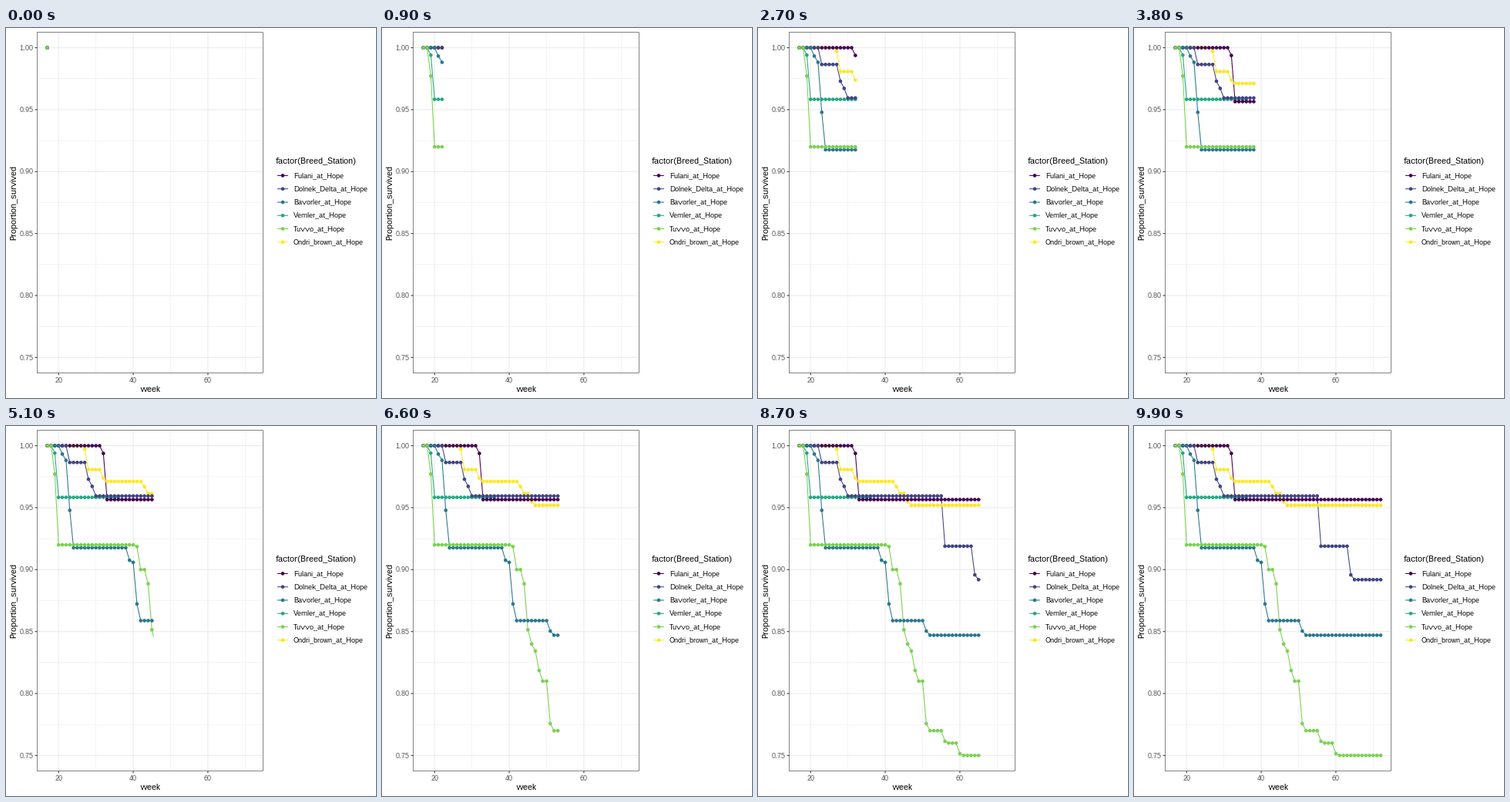
Write a matplotlib script that moves like this. It is 480 px wide and 480 px high and loops after 10000 ms.

```python
import numpy as np
import matplotlib.pyplot as plt
from matplotlib.animation import FuncAnimation
from matplotlib.patches import Rectangle

SIZE, FRAMES, INTERVAL = 480, 100, 100
PT = 0.72  # points per pixel at 100 dpi
FIRST, LAST = 17, 72
LEFT, RIGHT, TOP, BOTTOM = 40.35, 333.35, 5.5, 447.5
STROKE, DOT = 1.067, (4.62 * PT) ** 2
GRID, INK, GREY = "#EBEBEB", "#333333", "#4D4D4D"

plt.rcParams.update({
    "font.family": "Liberation Sans",
    "text.hinting": "default",
    "text.hinting_factor": 1,
    "path.snap": False,
    "lines.solid_capstyle": "butt",
})

# name, colour, flock size, last week, {day of trial: deaths}
FLOCKS = [
    ("Fulani", "#440154", 23, 72, {111: 1}),
    ("Dolnek_Delta", "#414487", 74, 72, {42: 1, 77: 1, 88: 1, 273: 3, 330: 2}),
    ("Bavorler", "#2A788E", 85, 72, {31: 1, 45: 6, 155: 1, 170: 4, 240: 1}),
    ("Vemler", "#22A884", 24, 36, {20: 1}),
    ("Tuvvo", "#7AD151", 100, 72, {19: 8, 174: 1, 175: 1, 194: 4, 197: 1, 203: 1,
                                   213: 1, 220: 2, 239: 4, 274: 1, 302: 1}),
    ("Ondri_brown", "#FDE725", 104, 72, {76: 2, 107: 1, 186: 1, 205: 1}),
]
DOT_ORDER = [3, 5, 0, 1, 2, 4]


def px(week):
    scale = (RIGHT - LEFT) / 1.1 / (LAST - FIRST)
    return LEFT + (RIGHT - LEFT) / 22 + (week - FIRST) * scale


def py(share):
    return TOP + (BOTTOM - TOP) / 22 + (1 - share) * (BOTTOM - TOP) / 1.1 / 0.25


def survival(flock, last, deaths):
    """Weekly mean of the daily share alive, with each week's reveal time."""
    weeks = np.arange(FIRST, last + 1)
    lost = sum(n * np.clip(weeks - FIRST + 1 - day / 7, 0, 1)
               for day, n in deaths.items())
    time = np.round((FRAMES - 1) * (weeks - FIRST) / (LAST - FIRST))
    return px(weeks), py(1 - lost / flock), time


fig = plt.figure(figsize=(4.8, 4.8), dpi=100, facecolor="white")
ax = fig.add_axes([0, 0, 1, 1])
ax.set(xlim=(0, SIZE), ylim=(SIZE, 0))
ax.axis("off")


def rule(x, y, color, width=STROKE):
    ax.plot(x, y, color=color, lw=width * PT, zorder=1)


def label(x, y, text, size=8.8, color="black", **kw):
    ax.text(x, y, text, fontsize=size * PT, color=color, va="baseline", **kw)


# Panel
for week in (30, 50, 70):
    rule([px(week)] * 2, [TOP, BOTTOM], GRID, STROKE / 2)
for share in np.arange(0.775, 1, 0.05):
    rule([LEFT, RIGHT], [py(share)] * 2, GRID, STROKE / 2)
for week in (20, 40, 60):
    x = px(week)
    rule([x, x], [TOP, BOTTOM], GRID)
    rule([x, x], [BOTTOM, BOTTOM + 2.75], INK)
    label(x, 460, str(week), color=GREY, ha="center")
for share in np.linspace(0.75, 1, 6):
    y = py(share)
    rule([LEFT, RIGHT], [y, y], GRID)
    rule([LEFT - 2.75, LEFT], [y, y], INK)
    label(35.4, y + 3.1, f"{share:.2f}", color=GREY, ha="right")
ax.add_patch(Rectangle((LEFT, TOP), RIGHT - LEFT, BOTTOM - TOP, fill=False,
                       ec=INK, lw=0.6 * PT, zorder=6))
label((LEFT + RIGHT) / 2, 472.3, "week", 11, ha="center")
label(13.2, (TOP + BOTTOM) / 2, "Proportion_survived", 11, ha="center",
      rotation=90, rotation_mode="anchor")

# Legend
colors = [flock[1] for flock in FLOCKS]
rows = 191.4 + 17.28 * np.arange(len(FLOCKS))
label(350, 176, "factor(Breed_Station)", 11)
for y, (name, color, *_) in zip(rows, FLOCKS):
    rule([352, 365.9], [y, y], color)
    label(373, y + 3.2, f"{name}_at_Hope")
ax.scatter([359] * len(rows), rows, s=DOT, c=colors, linewidths=0, zorder=3)

# Data layers
curves = [survival(*flock[2:]) for flock in FLOCKS]
lines = [ax.plot([], [], color=c, lw=STROKE * PT, zorder=3)[0] for c in colors]
dot_x, dot_y, dot_time = np.hstack([curves[i] for i in DOT_ORDER])
dot_color = np.repeat([colors[i] for i in DOT_ORDER],
                      [len(curves[i][0]) for i in DOT_ORDER])
dots = ax.scatter([], [], s=DOT, linewidths=0, zorder=4)


def update(frame):
    for line, (x, y, time) in zip(lines, curves):
        seen = time <= frame
        tip_x, tip_y = np.interp(frame, time, x), np.interp(frame, time, y)
        line.set_data(np.append(x[seen], tip_x), np.append(y[seen], tip_y))
    seen = dot_time <= frame
    dots.set_offsets(np.column_stack([dot_x, dot_y])[seen])
    dots.set_facecolor(list(dot_color[seen]))
    return [*lines, dots]


anim = FuncAnimation(fig, update, frames=FRAMES, interval=INTERVAL,
                     repeat=True, repeat_delay=0, blit=False)
plt.show()
```
